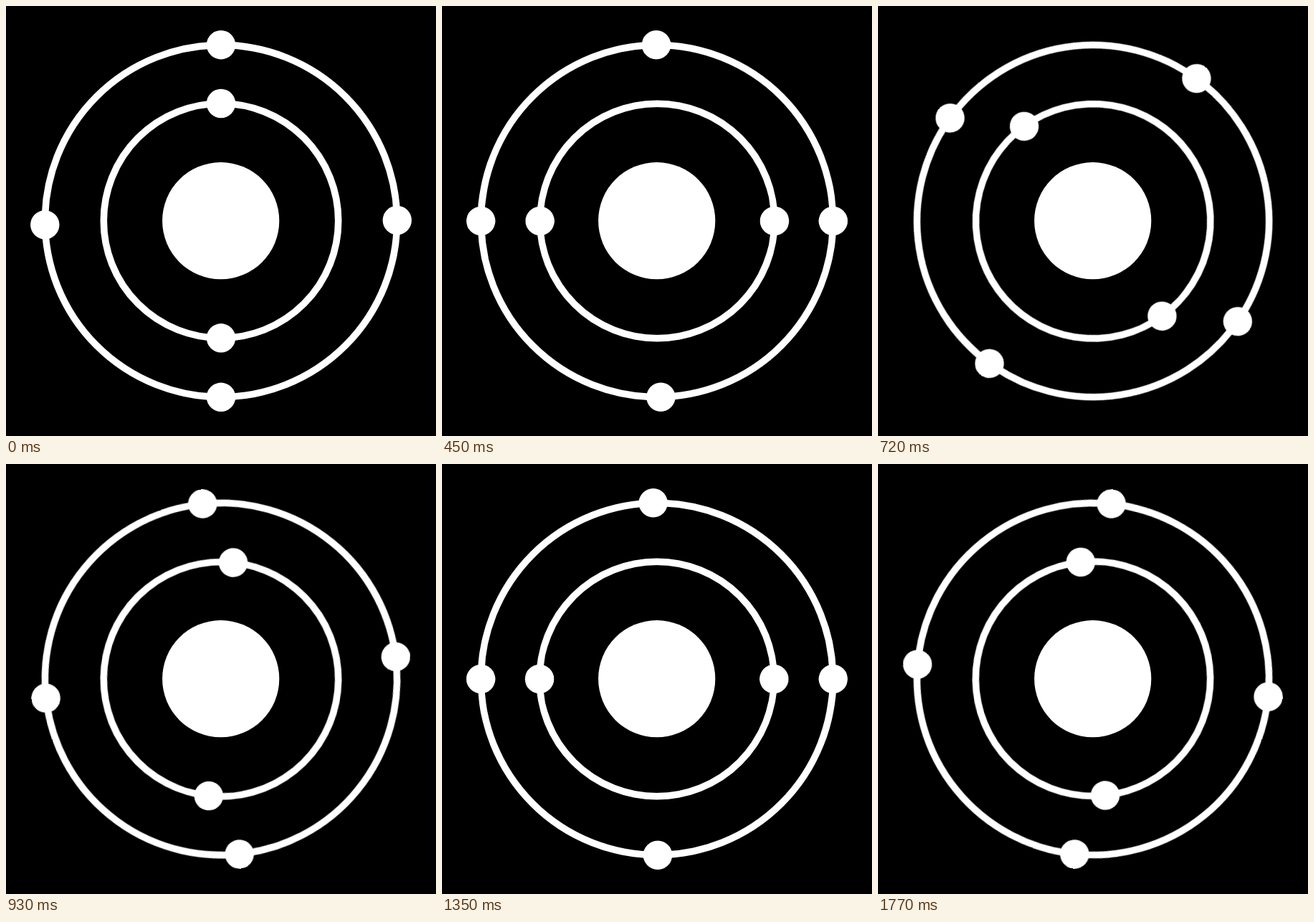
Write an HTML page that moves like this. It is 600 by 600 pixels and loops after 1.8 s.

```html
<!DOCTYPE html>
<html lang="en">
<head>
<meta charset="utf-8">
<title>Atom</title>
<style>
  html, body { margin: 0; width: 100%; height: 100%; overflow: hidden; background: #000; }
  svg { display: block; width: 100%; height: 100%; }
  .ring { fill: none; stroke: #fff; stroke-width: 9.6; }
  .shell { transform-origin: 0 0; animation: turn 1800ms steps(60, end) infinite; }
  .outer { animation-direction: normal; --turn: -360deg; }
  .inner { --turn: 360deg; }
  @keyframes turn {
    from { transform: rotate(0deg); }
    to { transform: rotate(var(--turn)); }
  }
</style>
</head>
<body>
<svg viewBox="-300 -300 600 600" fill="#fff">
  <circle cx="-0.3" cy="-0.3" r="81.6"/>
  <g class="shell outer">
    <circle class="ring" r="245.6"/>
    <circle cy="-245.8" r="20.2"/>
    <circle cx="245.8" cy="-1" r="20.2"/>
    <circle cy="245.8" r="20.2"/>
    <circle cx="-245.7" cy="5.3" r="20.2"/>
  </g>
  <g class="shell inner">
    <circle class="ring" cy="-0.3" r="163.7"/>
    <circle cy="-164" r="20.2"/>
    <circle cy="163.3" r="20.2"/>
  </g>
</svg>
</body>
</html>
```
